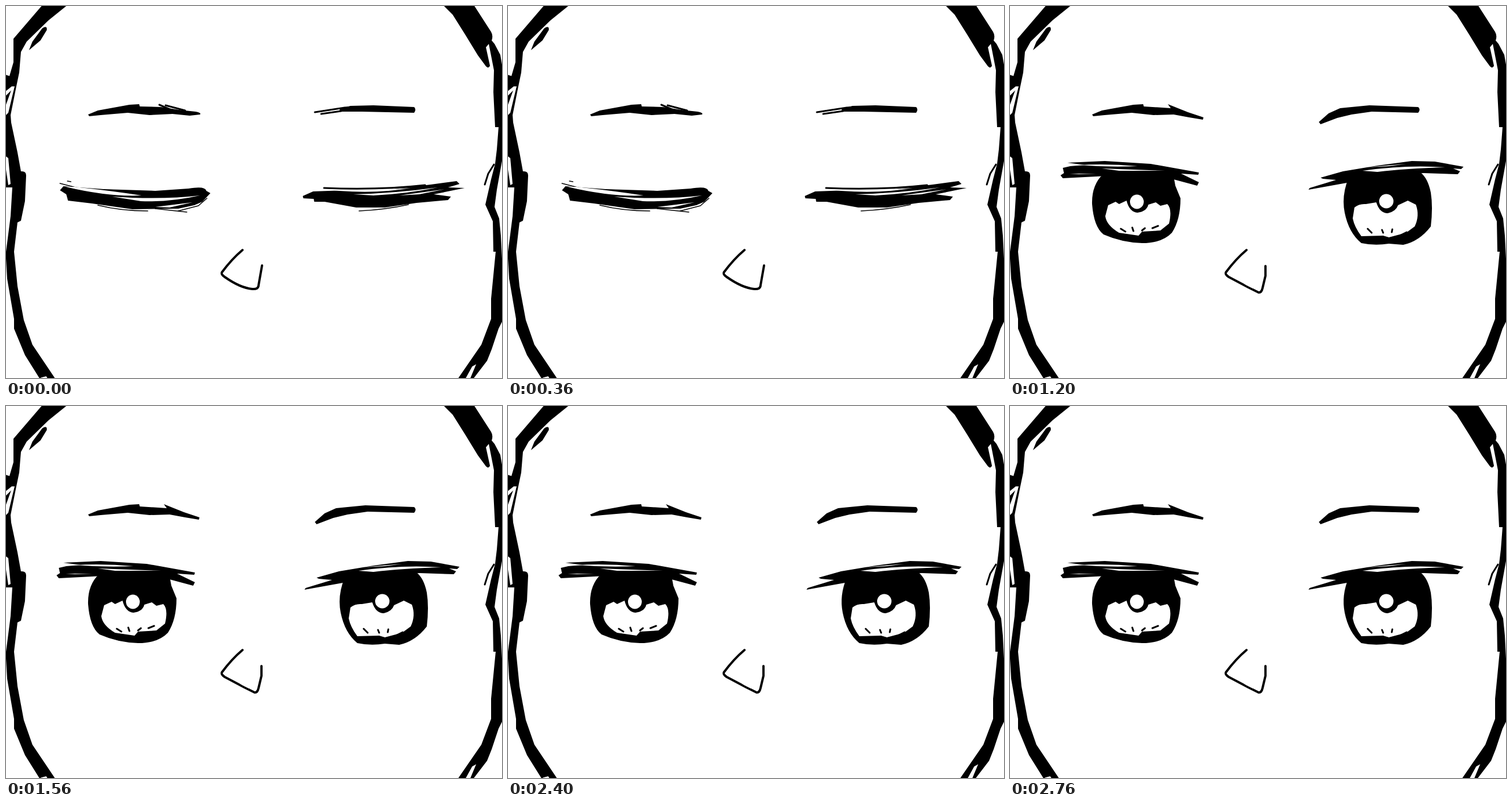
Write an HTML page that moves like this. It is 864 px wide and 648 px high and loops after 3000 ms.

```html
<!DOCTYPE html>
<html lang="en">
<head>
<meta charset="utf-8">
<title>Blink</title>
<style>
html, body { margin: 0; width: 100%; height: 100%; overflow: hidden; background: #fff; }
svg { display: block; width: 864px; height: 648px; }
.w { fill: #fff; }
.s { fill: none; stroke: #000; stroke-width: 3; stroke-linecap: round; stroke-linejoin: round; }
.n { stroke-width: 4; }
.t { stroke-width: 1.6; }
#shut, #half, #open, #drift, #head { animation: 3s step-end infinite; }
#shut { animation-name: shut; }
#half { animation-name: half; }
#open { animation-name: open; }
#drift { animation-name: drift; }
#head { animation-name: head; }
@keyframes shut { 0% { visibility: visible } 20%, 100% { visibility: hidden } }
@keyframes half { 0%, 40% { visibility: hidden } 20% { visibility: visible } 100% { visibility: hidden } }
@keyframes open { 0%, 60% { visibility: hidden } 40%, 80%, 100% { visibility: visible } }
@keyframes drift { 0%, 80%, 100% { visibility: hidden } 60% { visibility: visible } }
@keyframes head { 0%, 80%, 100% { visibility: visible } 60% { visibility: hidden } }
</style>
</head>
<body>
<svg viewBox="0 0 864 648">
  <g id="head">
    <path d="M62 0H105L74 25 36 62 26 80 23 116 18 140 8 190 9 203 20 255 26 288Q36 287 35 297L33 340 26 374 20 377 14 428 20 488 31 547 46 590 85 648H58L33 608 14 562V545L2 475 0 440V120L6 122 13 98V57Z"/>
    <path d="M63 39Q72 33 71 42L60 60 40 77 46 62Z"/>
    <path class="w" d="M0 148L10 140 15 140 4 186 0 190V172L9 147 0 156ZM0 262L4 265 8 310 4 312 0 285ZM0 316L11 316 8 366 3 405 0 428ZM62 647L70 645 72 648H60Z"/>
    <path d="M763 0H816L845 45Q849 52 846 60L851 66 861 85 864 102V270L855 320 851 350 859 370 862 400 864 440V550L858 562 846 598 838 618 815 648H788L828 590 845 545V510L853 428H849L848 375 835 346 845 302 852 275 855 250 858 211 852 211 849 150 850 112 841 66 836 72 843 104Q841 110 836 105L822 86 800 50 778 15Z"/>
    <path class="s" d="M850 276L840 292 834 311"/>
    <path class="w" d="M819 624L809 648H801L812 628Z"/>
  </g>

  <g id="shut">
    <path d="M143 189L160 182 215 172 232 171 233 175 270 176 302 181 330 184Q341 186 338 189L320 191 290 188 250 190 212 186 165 190 145 192Z"/>
    <path class="s" d="M267 172L290 182 328 187M278 173L312 182"/>
    <path d="M582 179L600 174 640 173 711 176Q715 180 711 186L620 184 580 184Z"/>
    <path class="s" d="M538 185L590 177 606 176M549 188L584 183"/>
    <path d="M94 321L100 314 170 319 260 322 318 318Q347 313 349 322L356 326 342 341 328 347 300 353 220 354 150 344 108 339 105 328Z"/>
    <path class="s t" d="M94 309L125 317 170 321M107 305L113 306M160 347Q200 357 247 357M260 353L315 359M300 357L335 348 350 335"/>
    <path class="w" d="M104 315Q180 333 236 330Q185 322 119 315ZM185 332Q270 338 338 330Q285 342 235 340ZM260 350L325 342 285 351Z"/>
    <path d="M517 331L535 323 590 321 660 321 740 311 785 305 790 310 770 316 799 317 745 328 775 332 770 338 715 343 660 351 610 351 555 341 537 341 536 336 518 335Z"/>
    <path class="s" d="M554 317Q650 321 730 312" stroke-width="5"/>
    <path class="s t" d="M615 357Q660 355 701 346"/>
    <path class="w" d="M562 320Q640 323 705 317Q650 327 580 322ZM605 328Q680 326 752 316Q700 327 640 330ZM685 330L765 319 720 328Z"/>
    <path class="s n" d="M412 425Q393 441 376 464Q374 467 381 472Q408 491 429 493Q440 494 440 486L446 452"/>
  </g>

  <g id="half">
    <path d="M141 186L170 184 200 182 222 178 199 177 220 174 229 171 240 174 290 177 318 187 339 194 336 198 312 195 280 189 245 189 200 188 145 192Z"/>
    <path d="M538 202L560 186 588 177 605 175 711 176 714 181 630 181 600 187 572 193 541 206Z"/>
    <path class="s t" d="M635 181L671 185"/>
    <path d="M107 302L270 306 346 319 344 324 302 321 328 329 324 334 290 329 175 327 100 330 97 325 87 323 91 310 98 308 106 311Z"/>
    <path class="w" d="M118 311L215 313 130 313ZM135 320Q210 315 275 319Q210 322 135 320Z"/>
    <path d="M151 325Q140 345 146 359Q153 378 178 387Q225 391 270 386Q298 378 297 348L294 332 280 322Z"/>
    <path class="w" d="M168 359Q176 349 196 351L203 363Q218 371 232 363L245 354 262 357 270 354Q277 368 268 375L250 378 175 374Q163 368 168 359Z"/>
    <ellipse class="w" cx="218.5" cy="353" rx="11" ry="9.5"/>
    <path class="s" d="M198 380L202 377M214 377V380M233 378L236 380M246 379L252 376"/>
    <path class="s t" d="M127 374L175 379M132 381L175 380M250 382L299 380M262 386L293 384"/>
    <path d="M540 324L590 314 640 307 700 303 745 306 789 313 785 317 780 321 770 327 720 326 590 333 555 340 537 339 545 333 520 336 542 328Z"/>
    <path class="w" d="M602 319Q690 309 765 314Q690 317 640 320Z"/>
    <path d="M589 332Q576 352 587 368Q598 386 630 389Q680 393 710 388Q726 381 728 371L729 332 715 320Z"/>
    <path class="w" d="M602 371Q606 357 616 355L638 358Q648 369 664 366L679 356 705 353Q712 369 702 375Q655 378 605 376Z"/>
    <ellipse class="w" cx="656" cy="354" rx="12" ry="10.5"/>
    <path class="s" d="M636 377L641 380M655 377L657 380M679 377L682 379"/>
    <path class="s t" d="M573 381L620 384M577 378L605 383M700 381L742 379"/>
    <path class="s n" d="M412 425Q393 441 376 464Q374 467 381 472Q401 486 416 490L440 491 446 452"/>
  </g>

  <g id="open">
    <path d="M143 189L160 182 215 172 232 171 233 175 280 178 275 171 310 185 337 194 336 198 312 194 285 189 250 190 212 186 165 190 145 192Z"/>
    <path d="M538 202L555 187 575 178 595 176 626 173 711 176Q716 180 711 186L630 184 595 189 570 195 541 206Z"/>
    <path d="M100 273L165 270 245 275 329 290 328 294 298 292 329 307 326 313 285 302 235 292 150 297 92 300 88 295 94 291 92 282 105 279 130 277Z"/>
    <path class="w" d="M120 277Q170 274 222 279Q170 281 120 277ZM160 283L270 287 190 287ZM104 292L150 292 120 293Z"/>
    <path d="M162 293Q142 312 143 345Q146 385 163 398Q195 412 230 413Q265 413 282 395Q297 372 297 335L288 313 286 302 265 291Z"/>
    <path class="w" d="M171 347L184 341 190 345 203 339Q208 359 222 360Q238 358 241 346L254 342 262 348 274 345Q283 354 277 379L262 391 230 393 224 400 190 395Q168 382 166 366Z"/>
    <ellipse class="w" cx="221" cy="341" rx="12" ry="12.5"/>
    <path class="s" d="M193 388L201 393M213 386L215 392M230 391L235 387M248 387L258 383"/>
    <path d="M541 299L580 288 640 278 700 270 740 271 790 280 786 284 772 283 784 288 780 293 720 291 620 302 570 311 520 320 522 317 568 303 545 301Z"/>
    <path class="w" d="M614 287Q690 276 758 281Q690 283 640 289ZM620 281L690 275 660 279Z"/>
    <path d="M590 299Q577 330 583 360Q590 395 612 413Q635 418 660 414L685 416Q713 410 733 384Q737 350 733 325Q728 300 715 290Z"/>
    <path class="w" d="M600 351Q608 344 620 345L638 342Q644 361 658 361Q672 358 676 347L693 339 707 346Q714 365 705 384L690 395 660 403 650 400 612 401Q600 385 597 370Z"/>
    <ellipse class="w" cx="655.5" cy="340" rx="12.5" ry="12.5"/>
    <path class="s" d="M623 388L630 395M648 390L650 395M666 389L665 394M681 399L691 394"/>
    <path class="s n" d="M412 425Q393 441 376 464Q374 467 381 472L415 490 433 499Q438 500 440 491L445 470V453"/>
    <path class="w" d="M407 484L424 490 423 492Z"/>
  </g>

  <g id="drift">
    <path d="M75 0H104L60 42 36 72 28 100 18 150 14 192 17 258 22 275 28 320 24 352 20 400 16 455 25 500 37 585 62 625 85 648H65L45 625 27 592 13 581 11 540 2 480 0 440V120L12 86 16 60 3 64 6 50Z"/>
    <path class="w" d="M0 262L6 270 9 345 0 400V310L6 336ZM15 126L6 165 9 140ZM51 24L27 56 45 38ZM19 68L16 82 24 74ZM40 603L60 632 52 625Z"/>
    <path d="M58 61L48 72 39 76 45 67Z"/>
    <path class="s" d="M15 174L13 205"/>
    <path d="M785 0H803L835 42 858 82 864 100V545L842 595 835 616 805 648H788L822 614 833 580 852 535 856 490 854 428 848 427 847 395 838 352 844 310 846 267 855 262 858 230 858 185 849 155 846 125 849 107 836 108 832 102 842 96 837 70 815 35Z"/>
    <path class="w" d="M800 9L825 40 840 72 828 52ZM844 75L855 106 849 97ZM864 180V300L857 355 853 320 860 240ZM859 365L864 390V480L860 430ZM826 620L806 639 817 624Z"/>
    <path class="s" d="M836 301L834 311"/>
    <path d="M155 189L220 187 258 183 271 183 259 176 290 177 315 186 349 201 345 207 325 202 295 193 260 192 200 193 155 191Z"/>
    <path d="M536 197L565 189 549 188 590 178 628 175 650 181 717 190 690 191 700 195 660 191 595 192 570 197 540 203Z"/>
    <path d="M99 273L155 270 225 270 300 278 340 294 322 296 329 309 326 313 285 301 235 293 150 297 84 299 79 294 90 290 82 286 105 279Z"/>
    <path class="w" d="M128 280Q190 273 260 281Q310 288 318 294Q260 284 180 285ZM115 290L170 286 140 292Z"/>
    <path d="M162 293Q141 315 142 347Q145 385 160 399Q195 412 222 414Q265 411 289 384Q297 362 298 333Q294 302 268 291Z"/>
    <path class="w" d="M171 347L187 350 203 345Q208 359 222 360Q238 358 241 348L262 350 276 348Q283 358 279 376L268 391 245 398 222 402 190 396Q168 382 166 366Z"/>
    <ellipse class="w" cx="221" cy="341" rx="12" ry="12.5"/>
    <path class="s n" d="M192 388L196 393M207 388L209 393M228 390L230 394M246 392L251 388"/>
    <path d="M528 316L545 303 541 299 557 291 600 282 635 276 700 271 750 271 786 278 770 281 792 287 750 292 720 291 620 302 575 309 532 319Z"/>
    <path class="w" d="M614 288Q690 276 758 282Q690 283 640 289ZM590 289L650 279 620 284Z"/>
    <path d="M590 299Q577 330 582 360Q588 395 612 411Q640 420 674 418L709 411Q731 387 737 351Q735 318 715 290Z"/>
    <path class="w" d="M600 354L620 352 640 351Q648 361 658 361Q670 359 675 350L693 348 707 351Q713 367 703 386L688 399 650 400 612 401Q602 395 600 379Z"/>
    <ellipse class="w" cx="655.5" cy="340" rx="12.5" ry="12.5"/>
    <path class="w" d="M590 350L588 374 594 388Z"/>
    <path class="s n" d="M625 390L630 396M653 393L654 396M668 391L667 395M683 394L689 391"/>
    <path class="s" d="M411 425L396 440 377 465 384 472 406 484"/>
    <path class="s n" d="M384 472L406 485 425 493 437 495 441 478 446 452"/>
  </g>
</svg>
</body>
</html>
```
